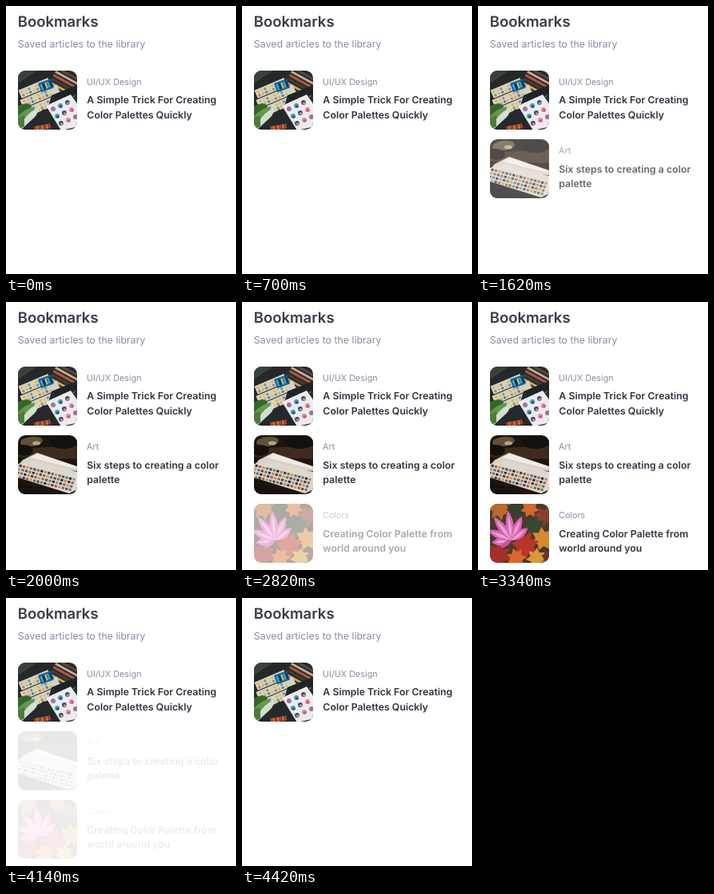
Animation of 288x336 px, one loop 4480 ms. Source, as an HTML page with a canvas:

```html
<!DOCTYPE html>
<html lang="en">
<head>
<meta charset="utf-8">
<title>Bookmarks</title>
<style>
html, body { margin: 0; width: 288px; height: 336px; overflow: hidden; background: #fff; }
canvas { display: block; }
</style>
</head>
<body>
<canvas id="stage" width="288" height="336"></canvas>
<script>
const LOOP = 4480, SIZE = 74, RADIUS = 9.5;
const ctx = document.getElementById('stage').getContext('2d');
ctx.textRendering = 'geometricPrecision';

function poly(g, color, pts) {
  g.fillStyle = color;
  g.beginPath();
  for (let i = 0; i < pts.length; i += 2) g.lineTo(pts[i], pts[i + 1]);
  g.closePath();
  g.fill();
}

function blob(g, color, x, y, rx, ry = rx, turn = 0) {
  g.fillStyle = color;
  g.beginPath();
  g.ellipse(x, y, rx, ry, turn, 0, Math.PI * 2);
  g.fill();
}

// Runs draw in a frame moved to x, y and turned by an angle
function turned(g, x, y, angle, draw) {
  g.save();
  g.translate(x, y);
  g.rotate(angle);
  draw();
  g.restore();
}

function swatches(g, colors, x, y, count, w, h, step) {
  for (let i = 0; i < count; i++) {
    g.fillStyle = colors[i % colors.length];
    g.fillRect(x + i * step, y, w, h);
  }
}

function star(g, color, x, y, r, angle, lobes = 7) {
  turned(g, x, y, angle, () => {
    g.fillStyle = color;
    g.beginPath();
    for (let i = 0; i < lobes * 2; i++) {
      const a = i * Math.PI / lobes, d = i % 2 ? r * 0.6 : r;
      g.lineTo(Math.cos(a) * d, Math.sin(a) * d);
    }
    g.fill();
  });
}

// Pointed lobe of a leaf growing from x, y
function lobe(g, color, x, y, length, width, angle) {
  turned(g, x, y, angle, () => {
    g.fillStyle = color;
    g.beginPath();
    g.moveTo(0, 0);
    g.quadraticCurveTo(length * 0.5, -width, length, 0);
    g.quadraticCurveTo(length * 0.5, width, 0, 0);
    g.fill();
  });
}

function desk(g) {
  g.fillStyle = '#25292a';
  g.fillRect(0, 0, SIZE, SIZE);
  poly(g, '#39413a', [0, 0, 24, 0, 0, 16]);
  turned(g, 38, 5, 0.5, () => {
    ['#55483f', '#c9a890', '#b4573d', '#3c3d3d', '#d8a54b', '#b5796d'].forEach((c, i) => {
      g.fillStyle = c;
      g.fillRect(6, -14 + i * 5, 36, 3);
    });
  });
  turned(g, 0, 26, -0.4, () => {
    g.fillStyle = '#d5d3c6';
    g.fillRect(1, -1, 40, 11);
    g.fillRect(-2, 11, 50, 11);
    g.fillRect(-6, 23, 46, 11);
    for (let row = 0; row < 3; row++) {
      const y = 1 + row * 12;
      swatches(g, ['#dfb53c', '#cfc089', '#868f90', '#e6d56d'], 3 - row * 2, y, 8, 3, 3, 4.8);
      swatches(g, ['#8a8e83', '#dcae38', '#5d7f8c', '#c9bd98'], 3 - row * 2, y + 4.5, 8, 3, 3, 4.8);
    }
  });
  turned(g, 25, 16, -0.35, () => {
    g.fillStyle = '#165e9b';
    g.fillRect(0, 0, 17, 12);
    swatches(g, ['#36b5c5', '#10305f', '#d9c850'], 2, 2, 5, 2, 8, 3);
  });
  poly(g, '#202426', [42, 31, 74, 18, 74, 30, 38, 45]);
  poly(g, '#eaebf0', [35, 44, 66, 30, 76, 44, 76, 70, 54, 75]);
  const inks = ['#d0588c', '#3f9fb2', '#3c4a70', '#d98a80'];
  for (let row = 0; row < 3; row++) {
    for (let col = 0; col < 3; col++) {
      const x = 44 + col * 9 + row * 5, y = 48 - col * 4 + row * 9;
      blob(g, inks[(row + col) % 4], x, y, 2.9);
      blob(g, inks[(row + col + 1) % 4], x + 0.8, y + 1, 2, 1.4);
    }
  }
  blob(g, '#36682e', 5, 50, 13, 7, -0.5);
  blob(g, '#649850', 9, 57, 15, 6, -0.7);
  lobe(g, '#d3ddd0', 2, 74, 38, 9, -0.85);
  poly(g, '#497d3b', [0, 59, 8, 56, 8, 70, 0, 74]);
  poly(g, '#26292b', [4, 74, 32, 48, 52, 74]);
  turned(g, 20, 70, -0.18, () => swatches(g, ['#b5432b', '#d9743b'], 0, 0, 7, 2.4, 6, 3));
}

function paints(g) {
  g.fillStyle = '#1b1410';
  g.fillRect(0, 0, SIZE, SIZE);
  poly(g, '#3f2b1d', [0, 17, 74, 13, 74, 30, 0, 27]);
  blob(g, '#5f5138', 17, 8, 14, 6, -0.1);
  blob(g, '#b7a67d', 23, 10, 5, 2.5);
  blob(g, '#14100d', 57, 9, 18, 8);
  blob(g, '#14100d', 8, 19, 11, 7);
  poly(g, '#d8d1c8', [6, 31, 24, 22, 74, 39, 74, 45, 0, 38]);
  poly(g, '#f0ebe4', [24, 23, 72, 39, 72, 42, 16, 28]);
  poly(g, '#ded7cd', [0, 36, 20, 32, 74, 46, 74, 68, 64, 73, 0, 53]);
  const hues = ['#303b4c', '#a8523f', '#c99454', '#5c7463', '#713f37', '#58788c', '#292a2b', '#b1885a'];
  turned(g, 0, 36, 0.25, () => {
    for (let r = 0; r < 4; r++) {
      const shift = hues.slice(r * 2).concat(hues.slice(0, r * 2));
      swatches(g, shift, 2 - r * 0.5, r * 4.6, 16, 3.2, 3, 4.6);
    }
  });
  poly(g, '#16110e', [0, 60, 46, 74, 0, 74]);
}

function autumn(g) {
  g.fillStyle = '#4a3a27';
  g.fillRect(0, 0, SIZE, SIZE);
  star(g, '#b9692f', 12, 6, 15, 0.5);
  star(g, '#37402f', 32, 8, 13, 0.1);
  star(g, '#cf6a2e', 50, 6, 12, 0.2);
  star(g, '#8a3f2b', 67, 16, 13, 0.7);
  star(g, '#3b4733', 56, 28, 14, 0.4);
  star(g, '#d58a32', 66, 44, 15, 0.1);
  star(g, '#b93429', 44, 52, 18, 0.6);
  star(g, '#a42f2b', 10, 64, 17, 0.4);
  star(g, '#d7672a', 33, 68, 13, 0.8);
  star(g, '#d79a36', 58, 68, 13, 0.3);
  star(g, '#6f3428', 73, 66, 9, 0.6);
  // Fan of lobes from one stem
  for (let i = 0; i < 6; i++) {
    const a = -3.25 + i * 0.52, r = 25 + 13 * Math.sin(i * 0.62);
    lobe(g, '#d765b5', 27, 46, r, 10, a);
    lobe(g, '#eba2d2', 27, 46, r * 0.85, 4, a);
  }
  lobe(g, '#c9549f', 27, 45, 17, 6, 2.5);
}

function thumb(draw) {
  const c = document.createElement('canvas');
  c.width = c.height = SIZE;
  const g = c.getContext('2d');
  g.beginPath();
  g.roundRect(0, 0, SIZE, SIZE, RADIUS);
  g.clip();
  draw(g);
  return c;
}

const items = [
  { art: thumb(desk), tag: 'UI/UX Design', lines: ['A Simple Trick For Creating', 'Color Palettes Quickly'] },
  { art: thumb(paints), tag: 'Art', lines: ['Six steps to creating a color', 'palette'], start: 1330 },
  { art: thumb(autumn), tag: 'Colors', lines: ['Creating Color Palette from', 'world around you'], start: 2670 }
];
const LEAVE = 3750, FADE = 520;

// cubic-bezier(0, 0, .58, 1), solved by bisection
function easeOut(x) {
  if (x <= 0) return 0;
  if (x >= 1) return 1;
  let lo = 0, hi = 1;
  for (let i = 0; i < 20; i++) {
    const t = (lo + hi) / 2;
    if (1.74 * (1 - t) * t * t + t * t * t < x) lo = t; else hi = t;
  }
  return lo * lo * (3 - 2 * lo);
}

function opacity(item, t) {
  if (!item.start) return 1;
  return easeOut((t - item.start) / FADE) * (1 - easeOut((t - LEAVE) / FADE));
}

function text(str, x, y, size, weight, color) {
  ctx.font = `${weight} ${size}px Inter, sans-serif`;
  ctx.fillStyle = color;
  ctx.fillText(str, x, y);
}

function render(t) {
  ctx.globalAlpha = 1;
  ctx.fillStyle = '#fff';
  ctx.fillRect(0, 0, 288, 336);
  text('Bookmarks', 14.7, 26, 18.5, 600, '#363b47');
  text('Saved articles to the library', 14.8, 51.6, 12.38, 400, '#858ca0');
  items.forEach((item, i) => {
    const y = 81 + i * 86.2;
    ctx.globalAlpha = opacity(item, t);
    ctx.drawImage(item.art, 15, Math.round(y));
    text(item.tag, 101, y + 17.6, 10.8, 400, '#858ca0');
    item.lines.forEach((line, n) => text(line, 101.3, y + 41.3 + n * 18.5, 12.35, 600, '#303540'));
  });
}

function tick() {
  render(performance.now() % LOOP);
  requestAnimationFrame(tick);
}
tick();
</script>
</body>
</html>
```
